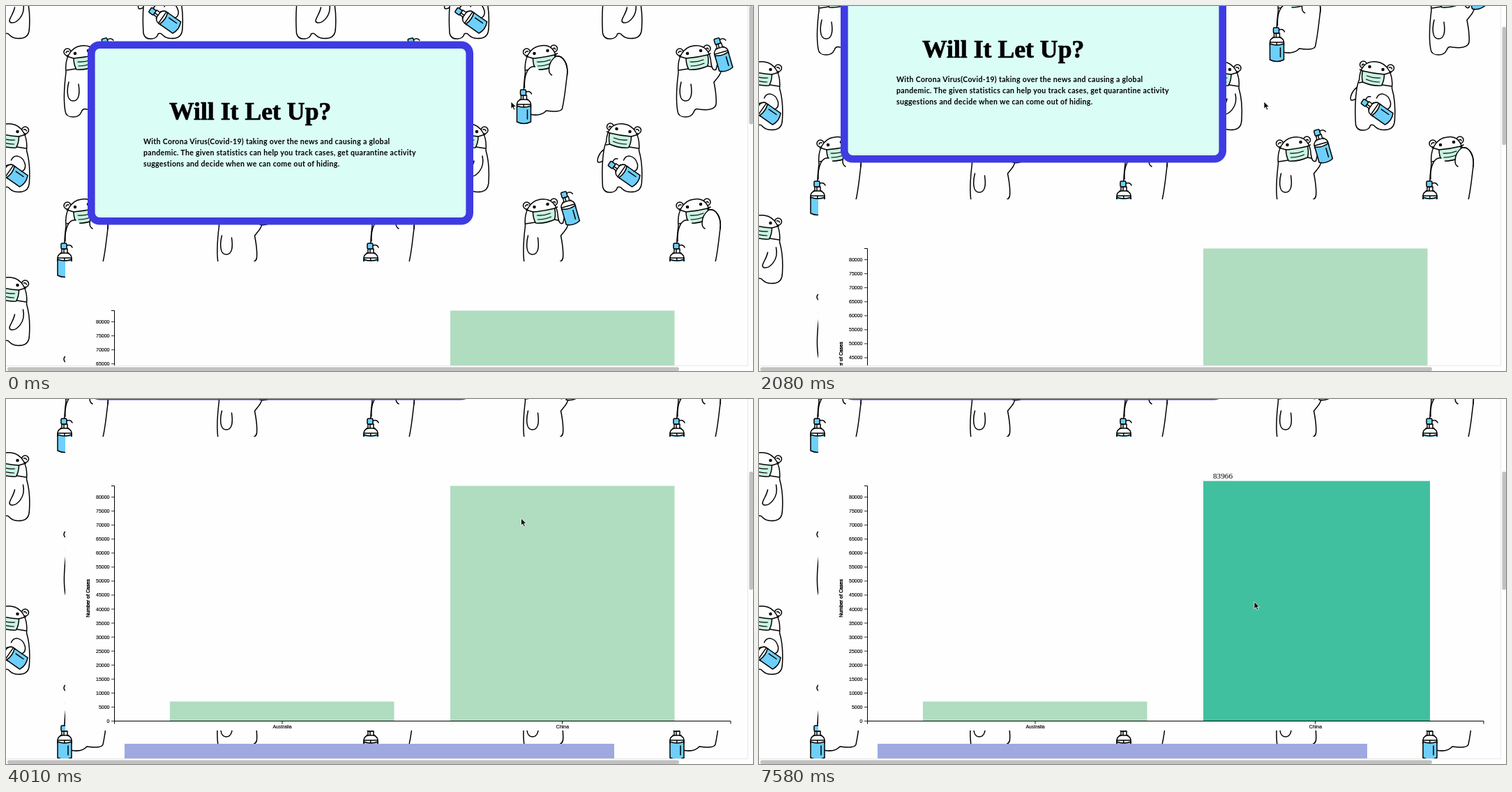
An HTML page that plays this animation: 1071 by 523 pixels, repeating every 8 s.

```html
<!DOCTYPE html>
<html lang="en">
<head>
<meta charset="utf-8">
<title>Case tracker</title>
<style>
html, body { margin: 0; width: 100%; height: 100%; overflow: hidden; background: #fefefe }
svg { display: block }
.ink { fill: #fefefe; stroke: #000; stroke-width: 1.5; stroke-linecap: round; stroke-linejoin: round }
.line { fill: none }
.mint { fill: #c9f2e1 }
.blue { fill: #6dcffa }
.title { font: 700 35.7px "Liberation Serif", serif; stroke: #000; stroke-width: .7 }
.intro { font: 700 10.6px Lato, sans-serif; letter-spacing: .29px }
.axis { font: 7px "Liberation Sans", sans-serif; stroke: #000; stroke-width: .15 }
.count { font: 11.2px "Liberation Serif", serif }
</style>
</head>
<body>
<svg width="1071" height="523" viewBox="0 0 1071 523">
  <defs>
    <g id="ears">
      <circle cx="6" cy="11" r="5"/><circle cx="45" cy="6" r="5"/>
      <path class="line" d="M4 12q1-3 4-2M44 6q2-2 3 1"/>
    </g>
    <g id="face">
      <circle cx="17" cy="13" r="1.5" fill="#000"/><circle cx="36" cy="9" r="1.5" fill="#000"/>
      <path class="line" d="M15 20L5 17M46 15L50 13M18 35L5 37M46 31L51 32"/>
      <path class="mint" d="M15 20Q30 19 46 15Q48 23 46 31Q33 37 19 36Q15 29 15 20Z"/>
      <path class="line" d="M21 25Q30 26 40 22M22 31Q32 31 41 27" stroke-width="1.2"/>
    </g>
    <g id="bottle">
      <path d="M-4-26H4V-20Q10-18 10-13H-10Q-10-18-4-20Z"/>
      <path class="line" d="M-6-20H6M-1-26V-20"/>
      <path class="blue" d="M-10-11Q0-7 10-11V12Q0 17-10 12Z"/>
      <path class="line" d="M-10-13V-9M10-13V-9M5-5V8M3-31Q9-33 11-28"/>
      <rect class="blue" x="-5" y="-34" width="8" height="8" rx="1.5"/>
    </g>
    <g id="raised">
      <use href="#ears"/>
      <path d="M4 40C2 20 10 4 26 2C42 0 50 10 51 28Q53 39 58 36L60 28Q66 27 66 34C66 42 60 48 55 54C57 64 59 76 58 86Q56 96 34 93Q28 91 26 97Q23 104 14 104Q4 104 3 96C0 80 2 56 4 40Z"/>
      <use href="#face"/>
      <use href="#bottle" transform="translate(69 24) rotate(-16)"/>
      <path class="line" d="M8 54C5 66 5 81 14 81C23 81 24 70 22 57"/>
    </g>
    <g id="paws">
      <use href="#ears"/>
      <path d="M4 40C2 20 10 4 26 2C38 0 45 6 48 17C58 15 66 28 64 44C62 58 61 74 57 92Q55 98 34 95Q28 102 16 101L3 99C0 80 2 56 4 40Z"/>
      <use href="#face"/>
      <path d="M3 62C2 44 8 30 18 32Q24 34 24 40L12 60Z" stroke="none"/>
      <path d="M48 17Q38 24 38 36Q38 42 42 44L62 42Q62 22 48 17Z" stroke="none"/>
      <path class="line" d="M3 62C2 44 8 30 18 32M48 17Q38 24 38 36Q38 42 42 44M48 17C58 15 66 28 64 44"/>
      <use href="#bottle" transform="translate(2 99)"/>
    </g>
    <g id="torso">
      <use href="#ears" transform="matrix(-1 0 0 1 58 0)"/>
      <path d="M54 40C56 20 48 4 32 2C16 0 8 10 7 28C3 36 0 60 2 92Q4 101 14 100Q22 99 23 93Q27 91 30 95Q36 101 48 99Q58 97 58 84C59 68 57 50 54 40Z"/>
      <use href="#face" transform="matrix(-1 0 0 1 58 0)"/>
    </g>
    <g id="plain">
      <use href="#torso"/>
      <path class="line" d="M49 48C53 66 40 78 32 77C25 75 35 66 37 55"/>
    </g>
    <g id="hug">
      <path d="M5 38C-3 42-8 56-4 57C0 58 4 53 8 51Z"/>
      <use href="#torso"/>
      <use href="#bottle" transform="translate(40 77) rotate(-55)"/>
      <path class="line" d="M32 54C36 45 48 46 52 60Q53 68 47 70"/>
    </g>
  </defs>
  <rect width="1071" height="523" fill="#fefefe"/>
  <g id="page">
    <g id="bears" class="ink"></g>
    <rect x="85" y="366" width="978" height="421" fill="#fefefe"/>
    <rect x="122.3" y="55.8" width="542.4" height="252.4" rx="12" fill="#dafdf6" stroke="#3e3be2" stroke-width="10.6"/>
    <text class="title" x="234" y="163">Will It Let Up?</text>
    <g class="intro">
      <text x="197" y="197.5">With Corona Virus(Covid-19) taking over the news and causing a global</text>
      <text x="197" y="213.7">pandemic. The given statistics can help you track cases, get quarantine activity</text>
      <text x="197" y="229.9">suggestions and decide when we can come out of hiding.</text>
    </g>
    <rect x="170" y="806" width="702" height="60" fill="#9fa9e0"/>
    <g id="bars"></g>
    <g id="axis" class="axis">
      <text transform="translate(120 597.5) rotate(-90)" text-anchor="middle" stroke-width=".4">Number of Cases</text>
    </g>
  </g>
  <rect x="1063" width="8" height="523" fill="#fefefe"/>
  <rect y="515" width="1071" height="8" fill="#fefefe"/>
  <path d="M1063.5 0V515.5H0" fill="none" stroke="#e8e8e8"/>
  <rect x="2" y="517.5" width="963" height="5.5" rx="2.7" fill="#c1c1c1"/>
  <rect id="thumb" x="1065.5" width="5.5" height="169.5" rx="2.7" fill="#c1c1c1"/>
  <path id="pointer" d="M0 0V10.2L2.4 8L4.1 12L5.9 11.2L4.2 7.4H7.4Z" stroke="#fff" stroke-width=".8"/>
</svg>
<script>
const $ = id => document.getElementById(id);
const add = (parent, tag, attrs, text = '') => {
  const el = document.createElementNS('http://www.w3.org/2000/svg', tag);
  for (const key in attrs) el.setAttribute(key, attrs[key]);
  el.textContent = text;
  return parent.appendChild(el);
};
const clamp = u => Math.min(1, Math.max(0, u));

// Bear wallpaper: four poses, alternating by row and column
for (let row = 0; row < 9; row++) {
  const odd = row & 1, pair = row >> 1;
  for (let col = -1; col < 5; col++) {
    const pose = (odd ? ['raised', 'paws'] : ['hug', 'plain'])[(col + pair) & 1];
    const x = (odd ? 82 : 195) + 219.5 * col;
    add($('bears'), 'use', { href: '#' + pose, x, y: -53 + 220 * pair + 108 * odd });
  }
}

// Chart axes
const base = 773.5, axis = $('axis');
add(axis, 'path', {
  d: `M151 436.5H155.5V${base}M155.5 777.5V${base}H1039V777.5M396 ${base}v4M797.5 ${base}v4`,
  fill: 'none', stroke: '#000', 'stroke-width': 1
});
for (let n = 0; n <= 80000; n += 5000) {
  const y = base - n / 5000 * 20.06;
  add(axis, 'path', { d: `M151 ${y}H155.5`, stroke: '#000', 'stroke-width': .8 });
  add(axis, 'text', { x: 148.5, y: y + 2.5, 'text-anchor': 'end' }, n);
}

// on, off: ticks at which hovering starts and ends
const bars = [
  { name: 'Australia', x: 235, top: 745.5, count: 6875, on: 35, off: 40 },
  { name: 'China', x: 637, top: 436.5, count: 83966, on: 44, off: 60 }
];
for (const bar of bars) {
  bar.rect = add($('bars'), 'rect', { x: bar.x });
  bar.label = add($('bars'), 'text', { x: bar.x + 14, y: bar.top - 10.5, class: 'count' }, bar.count);
  add(axis, 'text', { x: bar.x + 161, y: 784.3, 'text-anchor': 'middle' }, bar.name);
}

// Key points as [tick, ...values], joined by straight runs
const scrollKeys = [[-1, 0], [3, 18], [6, 18], [9, 89], [11, 89], [15, 227], [17, 227], [19, 312]];
const pointerKeys = [
  [20, 724, 137], [22, 738.5, 171], [24, 722, 253], [26, 555, 230], [28, 555, 230],
  [31, 514, 394], [35, 474, 442], [38, 474, 442], [46, 710, 290.5]
];
function along(keys, tick) {
  const next = keys.findIndex(key => key[0] > tick);
  if (next < 1) return keys.at(next).slice(1);
  const a = keys[next - 1], b = keys[next];
  const u = (tick - a[0]) / (b[0] - a[0]);
  return a.slice(1).map((v, i) => v + (b[i + 1] - v) * u);
}

function draw() {
  // The screen refreshes in ticks; motion starts with tick 0
  const t = performance.now() % 8000;
  const tick = Math.max(-1, Math.floor((t - 742) / 148.4));
  const [scroll] = along(scrollKeys, tick);
  $('page').setAttribute('transform', `translate(0 ${-scroll})`);
  $('thumb').setAttribute('y', scroll / 3);
  $('pointer').setAttribute('transform', `translate(${along(pointerKeys, tick)})`);
  for (const { rect, label, top, on, off } of bars) {
    const hover = tick < off ? clamp((tick - on + 1) / 2) : 0;
    const y = top - 7 * hover;
    rect.setAttribute('y', y);
    rect.setAttribute('height', base - .5 - y);
    rect.setAttribute('width', 321.5 + 3.5 * hover);
    rect.style.fill = `color-mix(in srgb, #40c09f ${hover * 100}%, #b0dcbf)`;
    label.style.display = hover ? '' : 'none';
  }
  requestAnimationFrame(draw);
}
draw();
</script>
</body>
</html>
```
